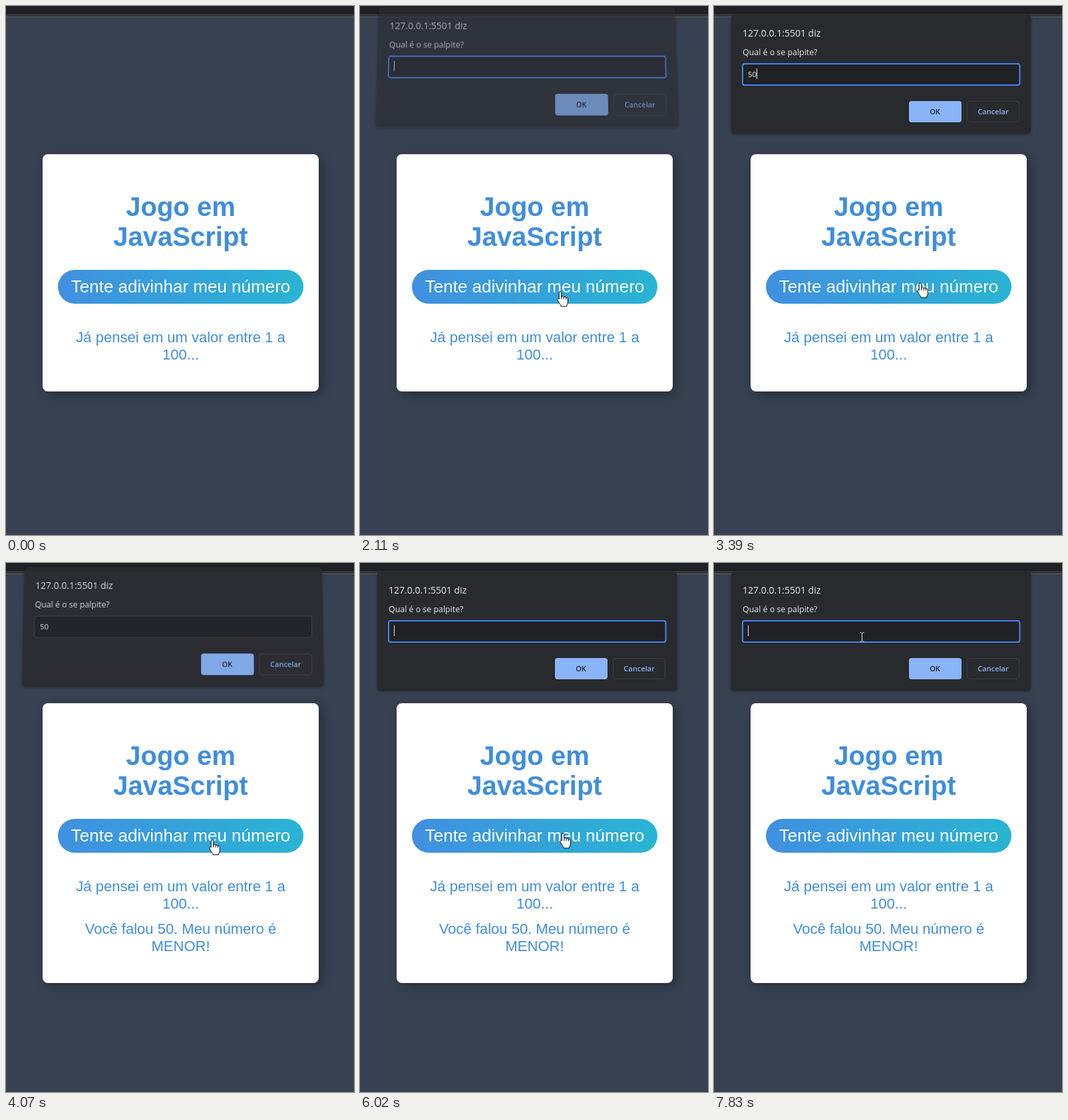
An HTML page for the animation above (8 s loop, 523x796 px).

```html
<!DOCTYPE html>
<html lang="pt">
<head>
<meta charset="utf-8">
<title>Jogo em JavaScript</title>
<style>
  html, body { margin: 0; width: 100%; height: 100%; overflow: hidden; background: #374151; }
  #stage { position: absolute; left: 0; top: 0; width: 523px; height: 796px; overflow: hidden; }
  svg { position: absolute; left: 0; top: 0; overflow: visible; }
  #card { position: absolute; left: 55px; width: 415px; background: #fff; border-radius: 8px;
          box-shadow: 5px 5px 15px rgba(0, 0, 0, .3); }
  #page text { font: 22px "Liberation Sans", Arial, sans-serif; text-anchor: middle; fill: #3f8edc; }
  #page .title { font-size: 40px; font-weight: bold; }
  #page .label { font-size: 26px; fill: #fff; }
  #dialog { position: absolute; left: 26px; top: 13px; width: 450px; height: 179px; background: #292a2d;
            border-radius: 5px; box-shadow: 0 1px 4px rgba(0, 0, 0, .45); }
  #dialog text { font-family: "Open Sans", "Noto Sans", sans-serif; fill: #e8eaed; }
  #dialog .btn { font-size: 11px; font-weight: 600; text-anchor: middle; }
</style>
</head>
<body>
<div id="stage">
  <svg width="523" height="796">
    <rect width="523" height="12" fill="#202124"/>
    <rect y="12" width="523" height="4" fill="#35363a"/>
    <rect y="16" width="523" height="1" fill="#5a5d62"/>
  </svg>
  <div id="card"></div>
  <svg id="page" width="523" height="796">
    <defs>
      <linearGradient id="blue">
        <stop offset="0" stop-color="#4090e0"/>
        <stop offset="1" stop-color="#29b4d3"/>
      </linearGradient>
    </defs>
    <g id="content">
      <text class="title" x="262.5" y="316">Jogo em</text>
      <text class="title" x="262.5" y="361">JavaScript</text>
      <rect x="78" y="397" width="369" height="51" rx="25.5" fill="url(#blue)"/>
      <text class="label" x="262.5" y="431">Tente adivinhar meu número</text>
      <text x="262.5" y="506">Já pensei em um valor entre 1 a</text>
      <text x="262.5" y="532">100...</text>
      <g id="answer">
        <text x="262.5" y="570">Você falou 50. Meu número é</text>
        <text x="262.5" y="596">MENOR!</text>
      </g>
    </g>
  </svg>
  <div id="dialog">
    <svg width="450" height="179" viewBox="26 13 450 179">
      <text x="43" y="46" font-size="14">127.0.0.1:5501 diz</text>
      <text x="43" y="74" font-size="12.4">Qual é o se palpite?</text>
      <rect id="field" x="43" y="87" width="416.5" height="32" rx="3" fill="#202124"/>
      <text id="typed" x="51" y="107" font-size="11.4"></text>
      <rect id="caret" y="94" width="1" height="16" fill="#e8eaed"/>
      <rect x="293" y="143" width="79" height="32" rx="4" fill="#8ab4f8"/>
      <text class="btn" x="332" y="163" style="fill:#202124">OK</text>
      <rect x="380.5" y="143.5" width="78" height="31" rx="4" fill="none" stroke="#3c4043"/>
      <text class="btn" x="419.5" y="163" style="fill:#8ab4f8">Cancelar</text>
    </svg>
  </div>
  <svg width="523" height="796">
    <circle id="click" cx="300" cy="429" r="12" fill="#ff0" fill-opacity=".47"/>
    <g id="pointer" stroke-linejoin="round">
      <path id="arrow" d="M.5 .5V16.5L4.2 13L6.7 18.6L9 17.6L6.5 12.2H11.5Z" fill="#fff" stroke="#000"/>
      <g id="hand" transform="translate(.7 .5)" stroke="#000">
        <path fill="#fff" d="M-1.5 11.5V2a1.8 1.8 0 0 1 3.6 0v6c.5-1.3 3.3-1 3.4.6c.6-1.2 3.2-.9 3.3.8c.7-.9 2.8-.5 2.8 1.3v5.3c0 3-1.8 4-1.8 6.5h-8.5c0-2.5-2.6-4-5-9.3c-1-2 1-3.2 2.2-1.7z"/>
        <path fill="none" d="M2.1 7.5v4M5.5 8.6v3M8.8 9.4v2.5"/>
      </g>
      <path id="beam" d="M-2.5 -6.5h2M1.5 -6.5h2M.5 -6V7M-2.5 7.5h2M1.5 7.5h2" fill="none"/>
    </g>
  </svg>
</div>
<script>
const LOOP = 8000, REPLY = 4010;
const $ = id => document.getElementById(id);
const clamp = v => Math.max(0, Math.min(1, v));
const show = (id, on) => $(id).setAttribute('visibility', on ? 'visible' : 'hidden');

// Pointer moves: start, end, target point, bend point, ease-out power
const home = [494, 800];
const moves = [
  { from: 350, to: 1170, end: [306, 441], bend: [365, 600], ease: 1.4 },
  { from: 1170, to: 1400, end: [300, 429], bend: [304, 434], ease: 1.5 },
  { from: 2400, to: 2580, end: [308, 416], bend: [303, 420], ease: 1.3 },
  { from: 2799, to: 2800, end: [309, 416], bend: [309, 416], ease: 1 },
  { from: 4729, to: 4730, end: [309, 415], bend: [309, 415], ease: 1 },
  { from: 6000, to: 6820, end: [222, 117], bend: [225, 260], ease: 1.15 },
  { from: 6820, to: 6880, end: [222, 111], bend: [222, 114], ease: 1 }
];

function pointerAt(t) {
  let p = home;
  for (const m of moves) {
    if (t < m.from) break;
    const s = 1 - Math.pow(1 - clamp((t - m.from) / (m.to - m.from)), m.ease), r = 1 - s;
    p = p.map((v, i) => r * r * v + 2 * r * s * m.bend[i] + s * s * m.end[i]);
  }
  return p.map(Math.round);
}

function drawPointer(t, lift) {
  const [x, y] = pointerAt(t), py = y + lift;
  const inside = (l, top, r, b, v) => x >= l && x <= r && v >= top && v <= b;
  const field = inside(43, 87, 460, 119, y);
  const text = inside(162, 280, 364, 369, py) || inside(105, 486, 420, 538, py);
  const kind = inside(78, 397, 447, 448, py) ? 'hand' : field || text ? 'beam' : 'arrow';
  for (const id of ['hand', 'beam', 'arrow']) show(id, id === kind);
  $('beam').setAttribute('stroke', field ? '#e4e4e4' : '#000');
  $('pointer').setAttribute('transform', `translate(${x} ${y})`);
  show('click', t >= 1820 && t < 1850);
}

function drawDialog(t) {
  const first = t < 5000, settled = first ? 2250 : 5780;
  const left = Math.max(0, settled - t), out = clamp((t - REPLY + 4) / 200);
  let lift = 15 * (left / 160) ** 2, alpha = clamp((172 - left) / 52);
  const closing = first && t >= REPLY;
  if (closing) {
    lift = 13 * (1 - (1 - out) ** 2);
    alpha = 1 - out * out;
  }
  const box = $('dialog').style;
  box.display = alpha > 0 ? 'block' : 'none';
  box.opacity = alpha;
  box.transform = lift < .05 ? 'none'
    : `perspective(500px) translateY(${-lift}px) rotateX(${lift * .33}deg) scaleY(${1 + lift * .0008})`;

  const typed = first ? '50'.slice(0, (t >= 3280) + (t >= 3390)) : '';
  $('typed').textContent = typed;
  $('field').setAttribute('stroke', closing ? '#3c4043' : '#4285f4');
  $('field').setAttribute('stroke-width', closing ? 1 : 2);
  $('caret').setAttribute('x', 51 + 6.5 * typed.length);
  const lit = first ? t < 2600 || (t >= 3120 && t < 3910)
                    : t < 6240 || (t >= 6770 && t < 7300) || t >= 7830;
  $('caret').style.display = lit ? '' : 'none';
}

function draw(t) {
  const replied = t >= REPLY, lift = replied ? 12 : 0;
  $('card').style.top = 223 - lift + 'px';
  $('card').style.height = (replied ? 421 : 357) + 'px';
  $('content').setAttribute('transform', `translate(0 ${-lift})`);
  show('answer', replied);
  drawDialog(t);
  drawPointer(t, lift);
}

const start = performance.now();
function tick() {
  draw((performance.now() - start) % LOOP);
  requestAnimationFrame(tick);
}
draw(0);
requestAnimationFrame(tick);
</script>
</body>
</html>
```
